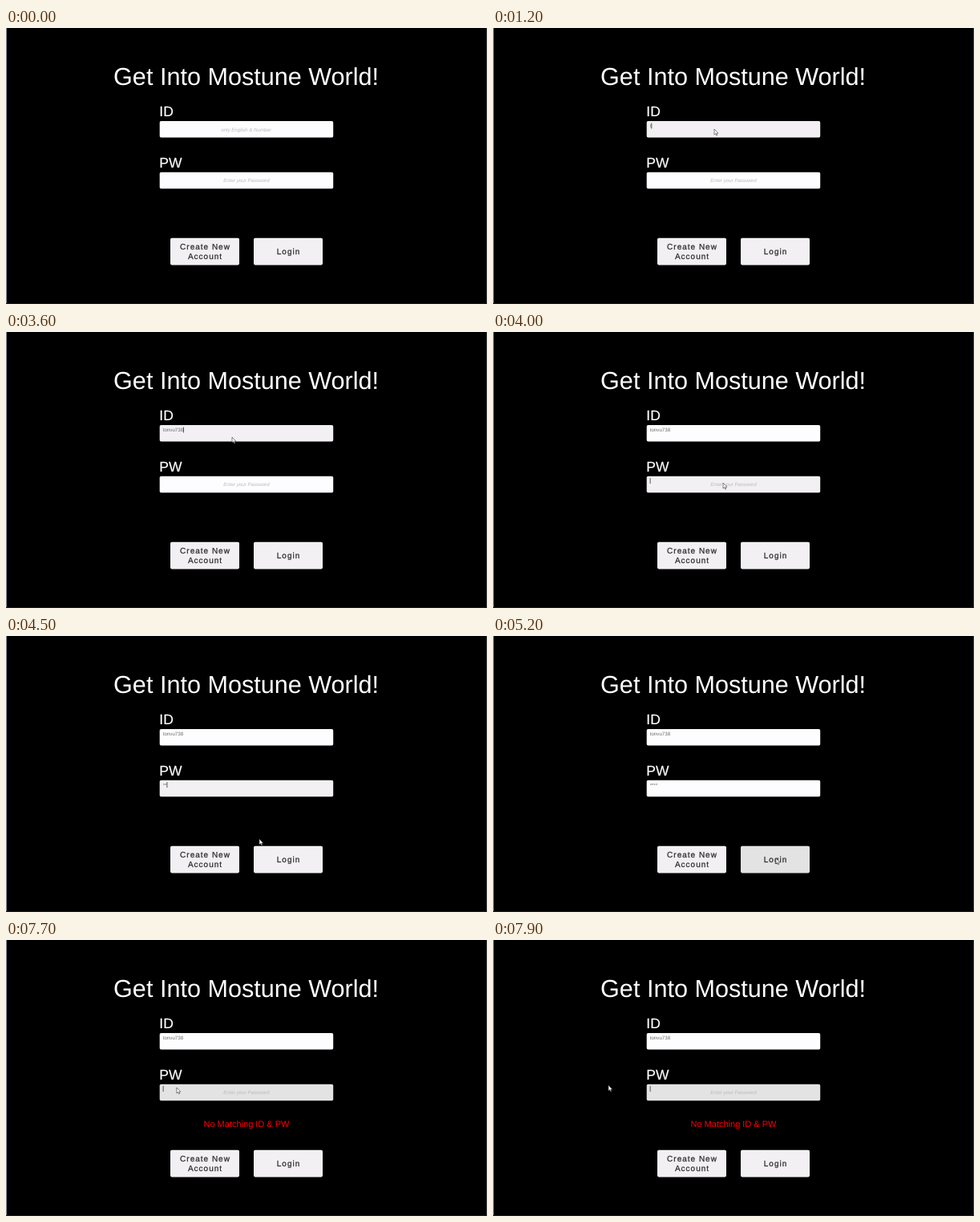
Write an HTML page that moves like this. It is 600 px wide and 344 px high and loops after 8000 ms.

```html
<!DOCTYPE html>
<html lang="en">
<head>
<meta charset="utf-8">
<title>Login form</title>
<style>
  html, body { margin: 0; width: 100%; height: 100%; overflow: hidden; background: #000; }
  svg { display: block; width: 600px; height: 344px; }
  text { font-family: "Liberation Sans", Arial, sans-serif; text-rendering: geometricPrecision; }
  .light { fill: #fff; }
  .label { font-size: 17.5px; stroke: #fff; stroke-width: .2px; }
  .mid { text-anchor: middle; }
  .hint { font-size: 6.2px; font-style: italic; fill: #bab8ba; }
  .value { font-size: 6.2px; fill: #6c6a6c; }
  .caret { fill: #333; }
  .button { font-size: 10px; letter-spacing: 1px; fill: #323232; stroke: #323232; stroke-width: .3px; }
  .error { font-size: 11px; fill: #f00; }
</style>
</head>
<body>
<svg viewBox="0 0 600 344">
  <rect width="600" height="344"/>
  <rect width="1" height="344" fill="#8890a0"/>
  <rect x="599" width="1" height="344" fill="#3a3a3a"/>
  <rect y="343" width="600" height="1" fill="#1c1c1c"/>

  <text class="light mid" x="299.6" y="71" font-size="30.6">Get Into Mostune World!</text>

  <text class="light label" x="191.3" y="110">ID</text>
  <g id="user">
    <rect x="191.7" y="116" width="216.5" height="20.5" rx="1.8"/>
    <text class="hint mid" x="299.6" y="128.7">only English &amp; Number</text>
    <text class="value" x="195.7" y="124"></text>
    <rect class="caret" y="118.5" width=".8" height="7"/>
  </g>

  <text class="light label" x="191.3" y="174">PW</text>
  <g id="pass">
    <rect x="191.7" y="179.8" width="216.5" height="20.5" rx="1.8"/>
    <text class="hint mid" x="299.9" y="192.3">Enter your Password</text>
    <text class="value" x="195.7" y="188"></text>
    <rect class="caret" y="182" width=".8" height="7"/>
  </g>

  <text id="error" class="error mid" x="300" y="233">No Matching ID &amp; PW</text>

  <rect x="205" y="261.7" width="86" height="33.7" rx="1.8" fill="#f2f0f3"/>
  <text class="button mid" x="248.5" y="276.2">Create New</text>
  <text class="button mid" x="248.5" y="288.1">Account</text>
  <g id="login">
    <rect x="309" y="261.7" width="86" height="33.7" rx="1.8"/>
    <text class="button mid" x="352.5" y="282.3">Login</text>
  </g>

  <path id="cursor" d="M0 0V7L1.6 5.6 2.7 8 3.8 7.5 2.8 5.2H4.9Z" fill="#fff" stroke="#333" stroke-width=".6"/>
</svg>
<script>
const LOOP = 8000, STEP = 100;
const ENTER = 200, ERROR = 7100, RETRY = 7700;
const PRESSED = '#e4e3e4';
const fieldLook = { idle: '#fdfcfe', hover: '#f6f5f7', focus: '#f2f0f3' };
const buttonLook = { idle: '#f2f0f3', hover: '#eae9ea', focus: '#e9e8e9' };

// Pointer moves: start, end, x, y. It rests in between.
const moves = [
  [200, 500, 267, 121], [600, 900, 276, 126],
  [3500, 3600, 282, 131], [3600, 4000, 287, 188],
  [4100, 4300, 297, 208], [4400, 4500, 316, 253], [4500, 5100, 353, 277],
  [5400, 6100, 268, 148], [6100, 6300, 256, 151],
  [6400, 6800, 235, 180], [6800, 7300, 237, 185], [7600, 7900, 144, 181]
];

const clicks = [
  { time: 700, on: 'user', hold: 0 },
  { time: 3900, on: 'pass', hold: 0 },
  { time: 5100, on: 'login', hold: 200 },
  { time: RETRY, on: 'pass', hold: 300 }
];

const fields = {
  user: { text: 'tonvu738', keys: [1200, 1800, 2100, 2200, 2300, 2900, 3100, 3200], clear: LOOP },
  pass: { text: '****', keys: [4200, 4300, 4600, 4700], clear: RETRY }
};

const get = id => document.getElementById(id);
const show = (el, on) => el.setAttribute('visibility', on ? 'visible' : 'hidden');
const ease = p => p * p * (3 - 2 * p);

function pointerAt(t) {
  let x = 360, y = 44;
  for (const [start, end, toX, toY] of moves) {
    const p = ease(Math.min(1, Math.max(0, (t - start) / (end - start))));
    x += (toX - x) * p;
    y += (toY - y) * p;
  }
  return [x, y];
}

function inside(box, [x, y]) {
  const b = box.getBBox();
  return x >= b.x && x <= b.x + b.width && y >= b.y && y <= b.y + b.height;
}

function paint(id, look, t, point, click) {
  const box = get(id).children[0];
  const focused = click?.on === id;
  let color = inside(box, point) && t >= ENTER ? look.hover : look.idle;
  if (focused) color = t < click.time + click.hold ? PRESSED : look.focus;
  box.setAttribute('fill', color);
  return focused;
}

function drawField(id, t, focused) {
  const { text, keys, clear } = fields[id];
  const [, hint, value, caret] = get(id).children;
  const count = t < clear ? keys.filter(key => key <= t).length : 0;
  value.textContent = text.slice(0, count);
  show(hint, count === 0);
  show(caret, focused);
  caret.setAttribute('x', 195.7 + (count ? value.getComputedTextLength() : 0));
}

function draw(time) {
  const t = Math.floor(time / STEP) * STEP;
  const point = pointerAt(t);
  const click = clicks.findLast(c => c.time <= t);
  for (const id in fields) drawField(id, t, paint(id, fieldLook, t, point, click));
  paint('login', buttonLook, t, point, click);
  show(get('error'), t >= ERROR);
  show(get('cursor'), t >= ENTER);
  get('cursor').setAttribute('transform', `translate(${point})`);
}

const start = performance.now();
function tick(now) {
  draw(Math.max(0, now - start) % LOOP);
  requestAnimationFrame(tick);
}
draw(0);
requestAnimationFrame(tick);
</script>
</body>
</html>
```
